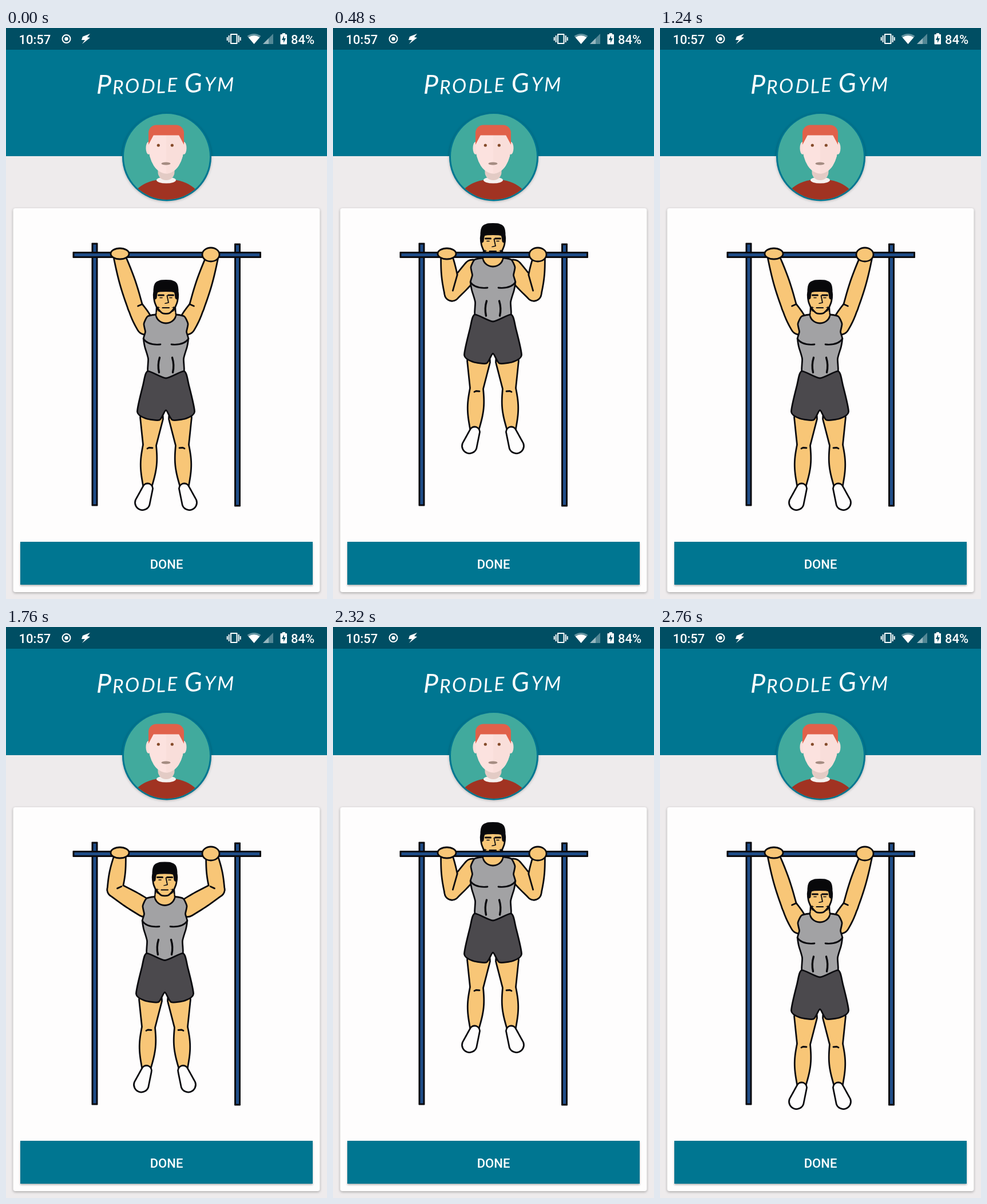
An HTML page with a canvas that plays this animation: 561x998 px, repeating every 3000 ms.

```html
<!DOCTYPE html>
<html lang="en">
<head>
<meta charset="utf-8">
<title>Pull-up</title>
<style>
  html, body { margin: 0; width: 100%; height: 100%; overflow: hidden; background: #eeebec; }
  canvas { position: absolute; left: 0; top: 0; width: 561px; height: 998px; }
  #athlete { filter: blur(.55px); }
</style>
</head>
<body>
<canvas id="page"></canvas>
<canvas id="athlete"></canvas>
<script>
const W = 561, H = 998, LOOP = 3000;
const MID = 279.5;              // the athlete's line of symmetry
const TAU = Math.PI * 2;
const TEAL = '#007691', INK = '#0b0b0f', SKIN = '#f8c677', LINE = 2.8;
const ratio = window.devicePixelRatio || 1;

// The pull-up runs through hang, mid, top, mid, over and over
const STARTS = [0, 200, 480, 960, 1240, 1760, 2000, 2520, 2760];
const HANG = { lift: 0, dx: 0, elbow: [226, 488] };
const HALF = { lift: 29.5, dx: -2, elbow: [190, 459] };
const TOP = { lift: 99, dx: 0, elbow: [208, 464] };
const CYCLE = [HANG, HALF, TOP, HALF];
const WRIST = [199, 402], SHOULDER = [244, 520];

function layer(id) {
  const canvas = document.getElementById(id);
  canvas.width = W * ratio;
  canvas.height = H * ratio;
  const c = canvas.getContext('2d');
  c.scale(ratio, ratio);
  c.lineJoin = c.lineCap = 'round';
  return c;
}

let ctx = layer('page');

// ---- basic shapes

function fill(color) {
  ctx.fillStyle = color;
  ctx.fill();
}

function ink(width = LINE, color = INK) {
  ctx.strokeStyle = color;
  ctx.lineWidth = width;
  ctx.stroke();
}

function oval(x, y, rx, ry, color) {
  ctx.beginPath();
  ctx.ellipse(x, y, rx, ry, 0, 0, TAU);
  fill(color);
}

function box(x, y, w, h, color, radius = 0) {
  ctx.beginPath();
  ctx.roundRect(x, y, w, h, radius);
  fill(color);
}

function path(...p) {
  ctx.beginPath();
  for (let i = 0; i < p.length; i += 2) ctx.lineTo(p[i], p[i + 1]);
}

function shadowed(blur, dy, alpha, draw) {
  ctx.save();
  ctx.shadowColor = `rgba(0,0,0,${alpha})`;
  ctx.shadowBlur = blur * ratio;
  ctx.shadowOffsetY = dy * ratio;
  draw();
  ctx.restore();
}

// ---- app screen

function label(text, x, y, align = 'left') {
  ctx.font = '500 22px Roboto, sans-serif';
  ctx.textAlign = align;
  ctx.fillStyle = '#fff';
  ctx.fillText(text, x, y);
}

function fan(size, color) {
  const half = 12 * size, top = 28 - 14 * size;
  ctx.beginPath();
  ctx.moveTo(433.5, 28);
  ctx.lineTo(433.5 - half, top);
  ctx.quadraticCurveTo(433.5, top - 8 * size, 433.5 + half, top);
  fill(color);
}

function signal(size, color) {
  path(449, 28, 449 + size, 28, 449 + size, 28 - size);
  fill(color);
}

function statusBar() {
  box(0, 0, W, 38, '#004e63');
  label('10:57', 22.5, 27.5);
  label('84%', 498, 27.5);

  ctx.beginPath();
  ctx.arc(105.5, 19, 7, 0, TAU);
  ink(2, '#fff');
  oval(105.5, 19, 3.2, 3.2, '#fff');
  path(147, 10, 134, 15, 132, 21, 138, 21, 133, 28, 147, 17, 142, 16);
  fill('#fff');

  ctx.strokeRect(393, 11, 10.5, 16);
  for (const side of [-1, 1]) {
    box(397.2 + side * 8.5, 13, 2, 12, '#fff');
    box(397.2 + side * 11.5, 16, 2, 6, '#fff');
  }

  fan(1, 'rgba(255,255,255,.4)');
  fan(0.82, '#fff');
  signal(18, 'rgba(255,255,255,.32)');
  signal(10, 'rgba(255,255,255,.4)');
  box(479.5, 11, 11.5, 17.5, '#fff', 1);
  box(483, 9, 5, 3, '#fff');
  path(486, 13, 482, 21, 485, 21, 485, 26, 489, 18, 486, 18);
  fill('#004e63');
}

function wordmark(text, cx, base) {
  const gap = 2.5;
  const chars = [...text].map(ch => {
    const font = `italic 400 ${ch === ch.toLowerCase() ? 34 : 46}px Lato, sans-serif`;
    ctx.font = font;
    return { ch: ch.toUpperCase(), font, w: ctx.measureText(ch.toUpperCase()).width };
  });
  let x = cx - chars.reduce((sum, c) => sum + c.w + gap, -gap) / 2;
  ctx.textAlign = 'center';
  ctx.fillStyle = '#fff';
  chars.forEach((c, i) => {
    ctx.save();
    ctx.translate(x + c.w / 2, base - i / 2 + Math.sin(i * 2.1));
    ctx.rotate(Math.sin(i * 2.3 + 1) * 0.05 - 0.02);
    ctx.font = c.font;
    ctx.fillText(c.ch, 0, 0);
    ctx.restore();
    x += c.w + gap;
  });
}

function avatar() {
  const cx = 280, hair = '#e0614a';
  shadowed(4, 1, 0.25, () => oval(281, 225.5, 78, 77, TEAL));
  ctx.save();
  ctx.beginPath();
  ctx.arc(281, 225, 75, 0, TAU);
  ctx.clip();
  box(200, 145, 160, 160, '#41aa9d');
  oval(cx, 305, 62, 41, '#a13322');
  oval(cx, 266, 17, 5.5, '#f5f0ee');
  box(cx - 14.5, 242, 29, 24, '#e3cbc5', [0, 0, 14, 14]);
  for (const side of [-1, 1]) oval(cx + side * 31, 210, 4.5, 11, '#fadeda');

  const chin = { x: 31, y: 48 };
  box(cx - 31, 176, 62, 78.5, '#fce2df', [10, 10, chin, chin]);
  box(cx, 176, 31, 78.5, '#f9deda', [0, 10, chin, 0]);
  box(cx - 31, 169.5, 62, 18, hair, [14, 14, 0, 0]);
  for (const side of [-1, 1]) {
    path(cx + side * 31, 185, cx + side * 22, 187, cx + side * 31, 204);
    fill(hair);
    oval(cx - 1.7 + side * 12, 205, 2.6, 2.6, '#854b2a');
  }
  oval(cx - 0.5, 237, 8, 2.6, '#a58c82');
  ctx.restore();
}

function screen() {
  box(0, 0, W, H, '#eeebec');
  box(0, 38, W, 186, TEAL);
  statusBar();
  wordmark('Prodle Gym', 278, 115);
  avatar();
  shadowed(4, 1.5, 0.3, () => box(12.5, 315, 536, 671, '#fefdfd', 4));
  shadowed(3, 2, 0.3, () => box(25, 898, 511, 75, TEAL));
  label('DONE', 280.5, 944.5, 'center');
}

// ---- athlete

function both(draw) {
  draw(-1);
  ctx.save();
  ctx.translate(2 * MID, 0);
  ctx.scale(-1, 1);
  draw(1);
  ctx.restore();
}

// Smooth symmetric outline from [half width, y] points, top to bottom
function outline(color, ...half) {
  const right = half.map(([w, y]) => [MID + w, y]);
  const left = half.filter(([w]) => w).map(([w, y]) => [MID - w, y]).reverse();
  const p = [...right, ...left], n = p.length;
  const at = i => p[(i + n) % n];
  const lean = (i, k) => (at(i + 1)[k] - at(i - 1)[k]) / 9;
  ctx.beginPath();
  ctx.moveTo(...p[0]);
  for (let i = 0; i < n; i++) {
    const [a, b] = [at(i), at(i + 1)];
    ctx.bezierCurveTo(a[0] + lean(i, 0), a[1] + lean(i, 1),
      b[0] - lean(i + 1, 0), b[1] - lean(i + 1, 1), b[0], b[1]);
  }
  fill(color);
  ink();
}

// Round-ended bone from a to b whose radius swells by bulge halfway
function bone(a, b, ra, rb, bulge = 0) {
  const angle = Math.atan2(b[1] - a[1], b[0] - a[0]);
  const shape = new Path2D();
  const edge = (t, side) => {
    const r = ra + (rb - ra) * t + bulge * Math.sin(Math.PI * t) - LINE / 2;
    shape.lineTo(a[0] + (b[0] - a[0]) * t - side * r * Math.sin(angle),
      a[1] + (b[1] - a[1]) * t + side * r * Math.cos(angle));
  };
  const quarter = Math.PI / 2;
  for (let t = 0; t <= 1; t += 1 / 16) edge(t, -1);
  shape.arc(...b, rb - LINE / 2, angle - quarter, angle + quarter);
  for (let t = 1; t >= 0; t -= 1 / 16) edge(t, 1);
  shape.arc(...a, ra - LINE / 2, angle + quarter, angle - quarter);
  return shape;
}

// Bones merged under one outline
function limb(color, ...bones) {
  ctx.strokeStyle = INK;
  ctx.lineWidth = LINE * 2;
  bones.forEach(b => ctx.stroke(b));
  ctx.fillStyle = color;
  bones.forEach(b => ctx.fill(b));
}

function arm({ elbow, lift, dx }) {
  const shoulder = [SHOULDER[0] + dx, SHOULDER[1] - lift];
  limb(SKIN, bone(WRIST, elbow, 10.5, 13, 2), bone(shoulder, elbow, 16, 13, 1));

  // The tighter the bend, the longer the crease inside the elbow
  const [ex, ey] = elbow;
  const fore = Math.atan2(WRIST[1] - ey, WRIST[0] - ex);
  const upper = Math.atan2(shoulder[1] - ey, shoulder[0] - ex);
  const mx = Math.cos(fore) + Math.cos(upper), my = Math.sin(fore) + Math.sin(upper);
  const size = Math.hypot(mx, my);
  const end = 13 + 32 * Math.max(0, Math.cos(fore - upper));
  path(ex + mx / size * 5, ey + my / size * 5, ex + mx / size * end, ey + my / size * end);
  ink();
}

function leg() {
  const knee = [251, 729], ankle = [247.5, 797];
  limb(SKIN, bone([254.5, 682], knee, 20, 11.5), bone(ankle, knee, 8.5, 11.5, 4));
  path(247, 735, 250, 733.5, 256, 734);
  ink();
  limb('#fefdfd', bone([247.5, 805], [238.5, 829.5], 9, 13));
}

function head() {
  box(MID - 17, 484, 34, 20, SKIN);
  path(MID - 17, 501, MID - 16, 484);
  ink();
  path(MID + 17, 501, MID + 16, 484);
  ink();
  outline(SKIN, [0, 456], [20, 461], [20, 478], [14, 492], [6, 498.5]);
  outline('#08080a', [0, 441.5], [11, 442.5], [18, 447], [20.5, 457], [20, 472], [17.5, 472], [15, 461], [0, 459.5]);
  for (const x of [271, 288]) {
    path(x - 4.5, 467, x + 4.5, 467);
    ink(3);
    path(x - 2, 471.5, x + 2, 471.5);
    ink(1.6);
  }
  path(281.5, 468, 284, 480, 278, 481.5);
  ink(1.8);
  path(273.5, 489, 285, 489);
  ink(2.2);
}

function body() {
  both(leg);
  head();
  outline('#a2a2a4', [0, 501], [18, 501], [32, 504], [38.5, 517], [36, 531], [39, 542],
    [37, 557], [31, 578], [30.5, 606], [0, 613]);
  ctx.beginPath();
  ctx.ellipse(MID, 500, 17.5, 16, 0, 0, Math.PI);
  fill(SKIN);
  ink();
  box(MID - 16, 496, 32, 8, SKIN);
  outline(SKIN, [0, 484], [14, 489], [6, 498.5]);
  box(MID - 13, 482, 26, 6, SKIN);
  path(273.5, 489, 285, 489);
  ink(2.2);
  both(() => {
    ctx.beginPath();
    ctx.moveTo(240, 543);
    ctx.quadraticCurveTo(248, 555, 270, 553);
    ink();
    ctx.beginPath();
    ctx.moveTo(268.5, 576);
    ctx.quadraticCurveTo(264.5, 589, 267.5, 602);
    ink(3.4);
  });
  outline('#4b494d', [0, 612], [32, 600], [40, 624], [50, 671], [35, 682.5], [11, 685], [0, 668]);
}

function rail(x, y, w, h) {
  box(x, y, w, h, INK, 1);
  box(x + 3, y + 3, w - 6, h - 6, '#1f4d88');
}

function fist(x, y, rx, ry) {
  oval(x, y, rx, ry, SKIN);
  ink();
}

function athlete(pose) {
  ctx.clearRect(0, 0, W, H);
  both(() => arm(pose));
  ctx.save();
  ctx.translate(pose.dx, -pose.lift);
  body();
  ctx.restore();
  rail(149.5, 375.5, 11, 460);
  rail(399, 376.5, 11, 460);
  rail(116.5, 391, 329.5, 11);
  fist(199, 394.5, 16, 9.5);
  fist(358, 396, 15, 12);
}

screen();
ctx = layer('athlete');

const start = performance.now();
let shown;
function tick() {
  const t = (performance.now() - start) % LOOP;
  const step = STARTS.filter(s => s <= t).length - 1;
  const pose = CYCLE[step % CYCLE.length];
  if (pose !== shown) athlete(shown = pose);
  requestAnimationFrame(tick);
}
tick();
</script>
</body>
</html>
```
